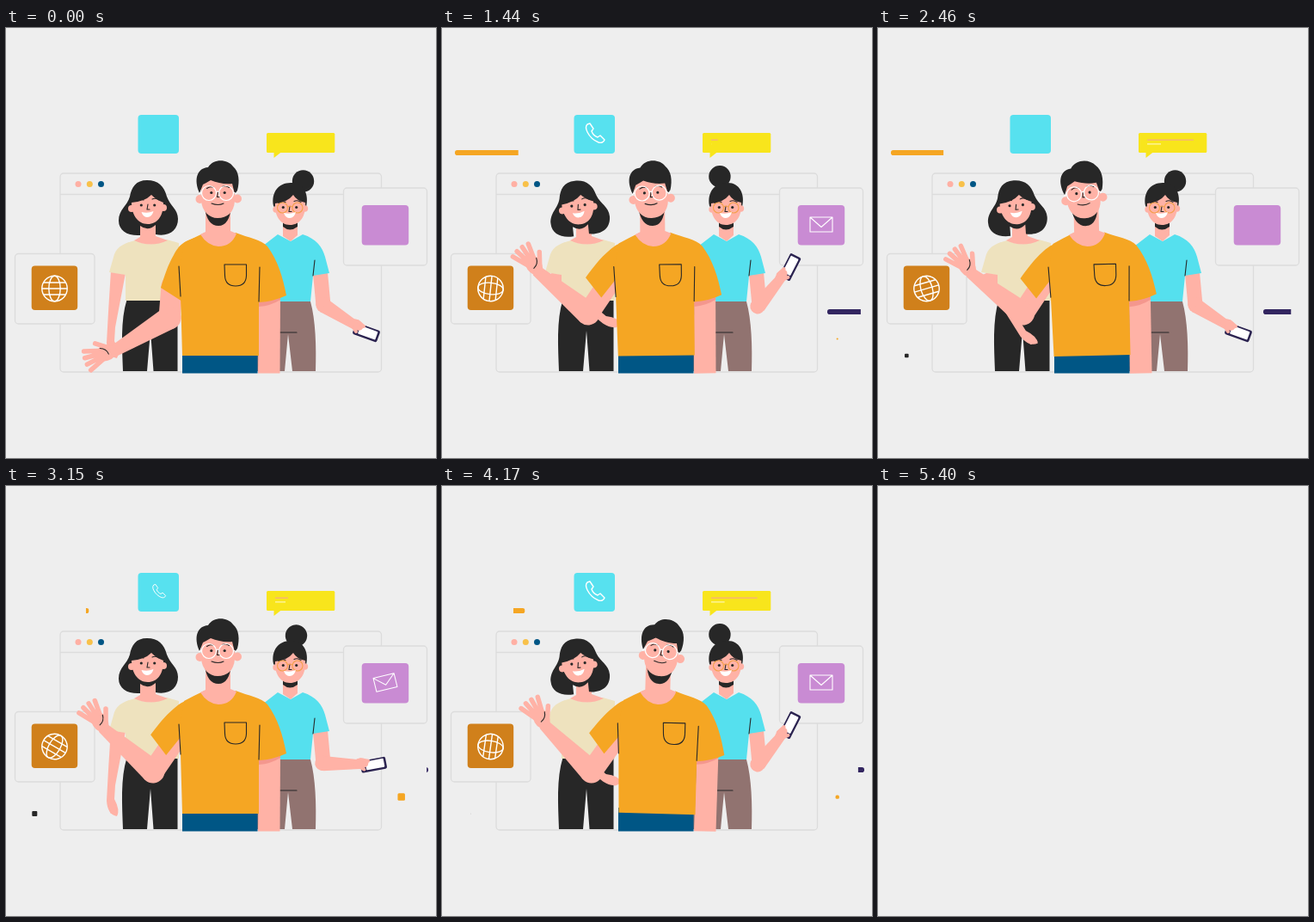
An HTML page for the animation above (5430 ms loop, 500 by 500 pixels).

```html
<!DOCTYPE html>
<html lang="en">
<head>
<meta charset="utf-8">
<title>Team waving</title>
<style>
  html, body { margin: 0; width: 100%; height: 100%; overflow: hidden; background: #eee; }
  svg { display: block; width: 100vw; height: 100vh; }
  .panel { fill: #eee; stroke: #dcdcdc; stroke-width: 1.3; }
  .skin { fill: #ffb2a6; }
  .dark { fill: #272727; }
  .white { fill: #fff; }
  .shirt { fill: #f5a623; }
  .line { fill: none; stroke: #272727; stroke-width: 1.1; stroke-linecap: round; stroke-linejoin: round; }
  .icon { fill: none; stroke: #fff; stroke-width: 1.4; stroke-linejoin: round; }
  .fingers { fill: none; stroke: #ffb2a6; stroke-width: 5.5; stroke-linecap: round; }
  .thin { stroke-width: 4; }
</style>
</head>
<body>
<svg viewBox="0 0 500 500">
  <defs>
    <clipPath id="topClip"><rect x="15" y="142" width="81.500" height="6" rx="2.800"/></clipPath>
    <clipPath id="sideClip"><rect x="448" y="327" width="43" height="6" rx="2.800"/></clipPath>
    <!-- eyes, brows and nose, centred between the eyes -->
    <g id="features">
      <circle class="dark" cx="-7.700" r="1.600"/><circle class="dark" cx="7.700" r="1.600"/>
      <path class="line" d="M-13-5Q-9-8-5-6M5-7Q9-9 13-6M0-1L-1 5H2"/>
    </g>
    <path id="smile" class="white" d="M-7-3Q0-1 7-4Q5 3 0 3Q-5 3-7-3Z"/>
  </defs>
  <g id="scene">
    <!-- window and panels -->
    <rect class="panel" x="63" y="169" width="373.500" height="231" rx="4"/>
    <path class="panel" d="M63 193.500H436.500"/>
    <circle cx="84" cy="181.500" r="3.500" fill="#ffb0a4"/>
    <circle cx="97.300" cy="181.500" r="3.500" fill="#f8c14a"/>
    <circle cx="110.500" cy="181.500" r="3.500" fill="#005685"/>
    <rect class="panel" x="10.500" y="262.500" width="92.500" height="81.500" rx="4"/>
    <rect class="panel" x="392.500" y="186" width="97" height="90" rx="4"/>
    <rect x="29.700" y="276.500" width="53.500" height="51.500" rx="4" fill="#d0801b"/>
    <rect x="413.700" y="206" width="54.500" height="46.500" rx="4" fill="#c98bd3"/>
    <rect x="153.500" y="101" width="47.500" height="45" rx="4" fill="#57e1ef"/>
    <g id="globe" class="icon">
      <circle r="14.700"/><ellipse rx="6.700" ry="14.700"/>
      <path d="M-14.700 0H14.700M-12.700-7H12.700M-12.700 7H12.700"/>
    </g>
    <path id="call" class="icon" d="M-9-10C-11-8-11-5-9-1C-6 5-1 9 4 11C7 12 10 11 11 8L6 3L3 5C0 4-3 1-4-2L-2-5L-6-11Z"/>
    <path id="mail" class="icon" style="stroke-width:1.100" d="M-13-8.500H13V8.500H-13ZL0 3L13-8.500"/>
    <rect x="303" y="122" width="79.300" height="23" rx="1.500" fill="#f8e51c"/>
    <path d="M311.500 144V151L320.500 144Z" fill="#f8e51c"/>
    <rect id="text1" x="313" y="129.500" height="1.300" fill="#f7b07c"/>
    <rect id="text2" x="313" y="134.300" height="1.200" fill="#fff8b4"/>
    <rect id="topBar" y="142" height="6" clip-path="url(#topClip)"/>
    <rect id="sideBar" y="327" height="6" clip-path="url(#sideClip)" fill="#332660"/>
    <rect id="dotL" class="dark" rx="1"/>
    <rect id="dotR" class="shirt" rx="1.500"/>

    <!-- left woman -->
    <path class="dark" d="M140.500 316H199.500V399H171.500L168 352L164 399H136C135 370 133 340 140.500 316Z"/>
    <g id="armL">
      <path class="skin" d="M122 282L139 285L127 348L126 364Q133 377 129 384Q118 382 117 366L119 330Z"/>
      <path class="fingers thin" d="M123 366L128 381M120 366L123 379"/>
    </g>
    <path fill="#eee2be" d="M150 247C139 250 130 253 126 263L120 284L139 287V317H201V250L187 246Q168 256 150 247Z"/>
    <path class="skin" d="M156 226H174V242L188 247Q168 256 149 247L156 243Z"/>
    <g id="headL">
      <path class="dark" d="M164 177C151 177 146 185 144 196C141 207 131 211 131 224C131 236 142 242 156 241V230Q165 237 174 229V240C190 243 200 235 200 222C200 211 191 207 187 196C184 184 177 177 164 177Z"/>
      <circle class="skin" cx="146" cy="210" r="4"/><circle class="skin" cx="183" cy="209" r="4"/>
      <path class="skin" d="M146 203Q161 202 169 194Q175 200 183 203C183 219 176 228 165 228C153 228 146 217 146 203Z"/>
      <use href="#features" x="165" y="206"/>
      <use href="#smile" x="164.500" y="217"/>
    </g>

    <!-- right woman -->
    <path fill="#917370" d="M290 318H354C360 340 361 370 360 399H333L328 356L324 399H290Z"/>
    <path class="line" d="M318 354H338"/>
    <path class="skin" d="M357 286L374 284L377.500 322L360.500 323Z"/>
    <g id="armR">
      <circle class="skin" cx="369" cy="322" r="8.700"/>
      <path class="skin" d="M375 316L406 339L403 350L365 330Z"/>
      <g transform="translate(419 354) rotate(20)">
        <rect x="-15" y="-7" width="30" height="14" rx="2" fill="#2b2350"/>
        <rect class="white" x="-9" y="-5.300" width="21.500" height="10" rx="1"/>
      </g>
      <ellipse class="skin" cx="407" cy="345" rx="9" ry="6" transform="rotate(28 407 345)"/>
      <path class="fingers thin" d="M409 341L416 347M404 348L407 353"/>
    </g>
    <path fill="#55e0ee" d="M316 240L331 248L345 240C361 245 368 255 371 266L376 285L357 288L354 318H290V260Z"/>
    <path class="line" d="M359 270L357 288"/>
    <path class="skin" d="M322 222H339V241L331 248L322 242Z"/>
    <path class="dark" d="M322 224H339V231Q330 238 322 231Z"/>
    <g id="bun"><circle class="dark" cx="345.500" cy="178" r="12.700"/></g>
    <path class="dark" d="M311 207C308 191 317 180 331 180C345 179 353 192 349 208L340 212H316Z"/>
    <circle class="skin" cx="314" cy="211" r="3.700"/><circle class="skin" cx="347.500" cy="210" r="3.700"/>
    <path class="skin" d="M313 204Q327 203 334 194Q338 201 348 203C349 219 342 229 330 229C319 229 312 218 313 204Z"/>
    <use href="#features" x="330" y="208.500"/>
    <g class="line" style="stroke:#f4a04c"><circle cx="321.500" cy="209" r="6"/><circle cx="339" cy="209" r="6"/><path d="M327.500 208Q330 206 333 208"/></g>
    <use href="#smile" x="330" y="218"/>

    <!-- man -->
    <rect x="205" y="374" width="87.500" height="27.500" fill="#005685"/>
    <path id="upper" fill="none" stroke="#ffb2a6" stroke-width="25" stroke-linecap="round"/>
    <g id="forearm">
      <circle class="skin" r="13.500"/>
      <path class="skin" d="M0-13.500L78-6.500V6.500L0 13.500Z"/>
      <g transform="translate(74) rotate(16)">
        <ellipse class="skin" cx="11" rx="13" ry="9"/>
        <path id="hand" class="fingers"/>
        <path class="line" d="M8-2Q9 5 16 7"/>
      </g>
    </g>
    <g id="sideArm">
      <path class="skin" d="M294 314L319 309L318.500 401.500H293Z"/>
      <path d="M294 318L319 311V316Q308 323 294 324Z" fill="#f4978e"/>
    </g>
    <g id="torso">
      <path id="sleeve" class="shirt" d="M224 243C206 247 201 253 195 264C188 276 184 289 180 302L205 318L218 280Z"/>
      <path class="shirt" d="M231 238Q246 256 267 238C282 244 297 246 304 254C316 270 322 290 326 311Q311 318 294 319V381H205L202 277L207 250Q218 244 231 238Z"/>
      <path class="line" d="M201 277L203 312M295 278L294 318M254 275H279.500V288Q279 300 267 300Q255 300 254.500 288Z"/>
      <path class="skin" d="M232 205H261V236L268 239Q262 254 247 254Q234 253 226 240L232 237Z"/>
      <g id="headM">
        <path class="dark" d="M231 209L262 207Q260 230 247 230Q234 230 231 209Z"/>
        <circle class="skin" cx="225.500" cy="199" r="5"/><circle class="skin" cx="269" cy="198.500" r="5"/>
        <path class="skin" d="M227 176H266V201C265 215 257 221 246 221C236 221 228 213 227 201Z"/>
        <path class="dark" d="M225 192C218 176 222 163 235 162C242 151 258 153 264 161C271 167 272 178 269 189L266 193L263 181C254 182 246 180 238 177Q233 180 229 182Z"/>
        <use href="#features" x="246.500" y="191.500"/>
        <g class="icon" style="stroke-width:1.200"><circle cx="236" cy="192" r="8.500"/><circle cx="256" cy="192" r="8.500"/><path d="M244.500 191Q246 189 247.500 191M227.500 191L224 193M264.500 191L268 193"/></g>
        <path class="line" d="M239 204Q247 207 253 204"/>
      </g>
    </g>
  </g>
</svg>
<script>
const LOOP = 5430, STEP = 30, BLANK = 5400;
const $ = id => document.getElementById(id);
const set = (id, attrs) => { for (const k in attrs) $(id).setAttribute(k, attrs[k]); };
const move = (id, transform) => set(id, { transform });
const mix = (a, b, k) => a + (b - a) * k;
const ease = x => (1 - Math.cos(Math.PI * Math.min(1, Math.max(0, x)))) / 2;
const ramp = (t, from, to) => ease((t - from) / (to - from));
// Rises from a to b, holds, falls from c to d
const pulse = (t, a, b, c, d) => ramp(t, a, b) - ramp(t, c, d);

// Grows from the left end, then leaves towards the right end
function bar(id, x, width, t) {
  const p = t % 1080, start = ramp(p, 600, 1050), end = ramp(p, 0, 450);
  set(id, { x: x + width * start, width: width * (end - start) });
}

function dot(id, cx, cy, size) {
  set(id, { x: cx - size / 2, y: cy - size / 2, width: size, height: size });
}

// Four fingers in a fan and a thumb
function drawHand() {
  let d = 'M6 5L20 14';
  for (let i = 0; i < 4; i++) {
    const a = -0.42 + i * 0.22;
    d += `M15 ${-6 + 3.3 * i}L${36 * Math.cos(a)} ${36 * Math.sin(a)}`;
  }
  set('hand', { d });
}

function draw(t) {
  $('scene').style.display = t >= BLANK ? 'none' : '';
  const half = t % 2700, quarter = t % 1350, third = t % 1800;

  move('globe', `translate(56.500 303) rotate(${t / 15})`);
  move('call', `translate(178 122) scale(${pulse(half, 300, 540, 2200, 2430)})`);
  const turn = -40 * (1 - ramp(half, 330, 530));
  move('mail', `translate(441 228.500) rotate(${turn}) scale(${pulse(half, 330, 470, 2200, 2430)})`);

  set('text1', { width: 54 * pulse(third, 0, 600, 800, 1650) });
  set('text2', { width: 16 * pulse(third, 300, 600, 1300, 1450) });
  bar('topBar', 15, 81.5, t);
  bar('sideBar', 448, 43, t);
  set('topBar', { fill: t < 1080 ? '#347bf0' : '#f5a623' });
  dot('dotL', 33.3, 381, 6 * pulse(quarter, 60, 420, 1000, 1350));
  dot('dotR', 459.7, 361.5, 8.5 * pulse(quarter, 30, 210, 800, 1130));

  const lean = pulse(half, 660, 1300, 2300, 2700);
  move('armL', `rotate(${-54 * lean} 130 286)`);
  move('headL', `translate(${-3 * lean} 0) rotate(${-6 * lean} 167 240)`);

  const lift = pulse(half, 300, 660, 1900, 2430);
  move('armR', `rotate(${-83 * lift} 369 324)`);
  move('bun', `translate(0 ${-2 * lift}) rotate(${-43 * lift} 330 205)`);

  const raise = pulse(t, 0, 450, 4950, 5400);
  const sway = 0.9 * raise * Math.sin(2 * Math.PI * (t - 3150) / 3900);
  const ex = mix(190, 171, raise) + 3 * sway, ey = mix(337, 332, raise);
  set('upper', { d: `M${193 + 4 * sway} 300L${ex} ${ey}` });
  move('forearm', `translate(${ex} ${ey}) rotate(${mix(149, 221, raise) + 4 * sway})`);
  move('sideArm', `rotate(${1.7 * sway} 306 401)`);
  move('torso', `rotate(${1.7 * sway} 248 400)`);
  move('sleeve', `rotate(${20 * raise} 210 262)`);
  move('headM', `rotate(${5 * sway} 247 235)`);
}

function frame() {
  draw(Math.floor(performance.now() % LOOP / STEP) * STEP);
  requestAnimationFrame(frame);
}
drawHand();
frame();
</script>
</body>
</html>
```
